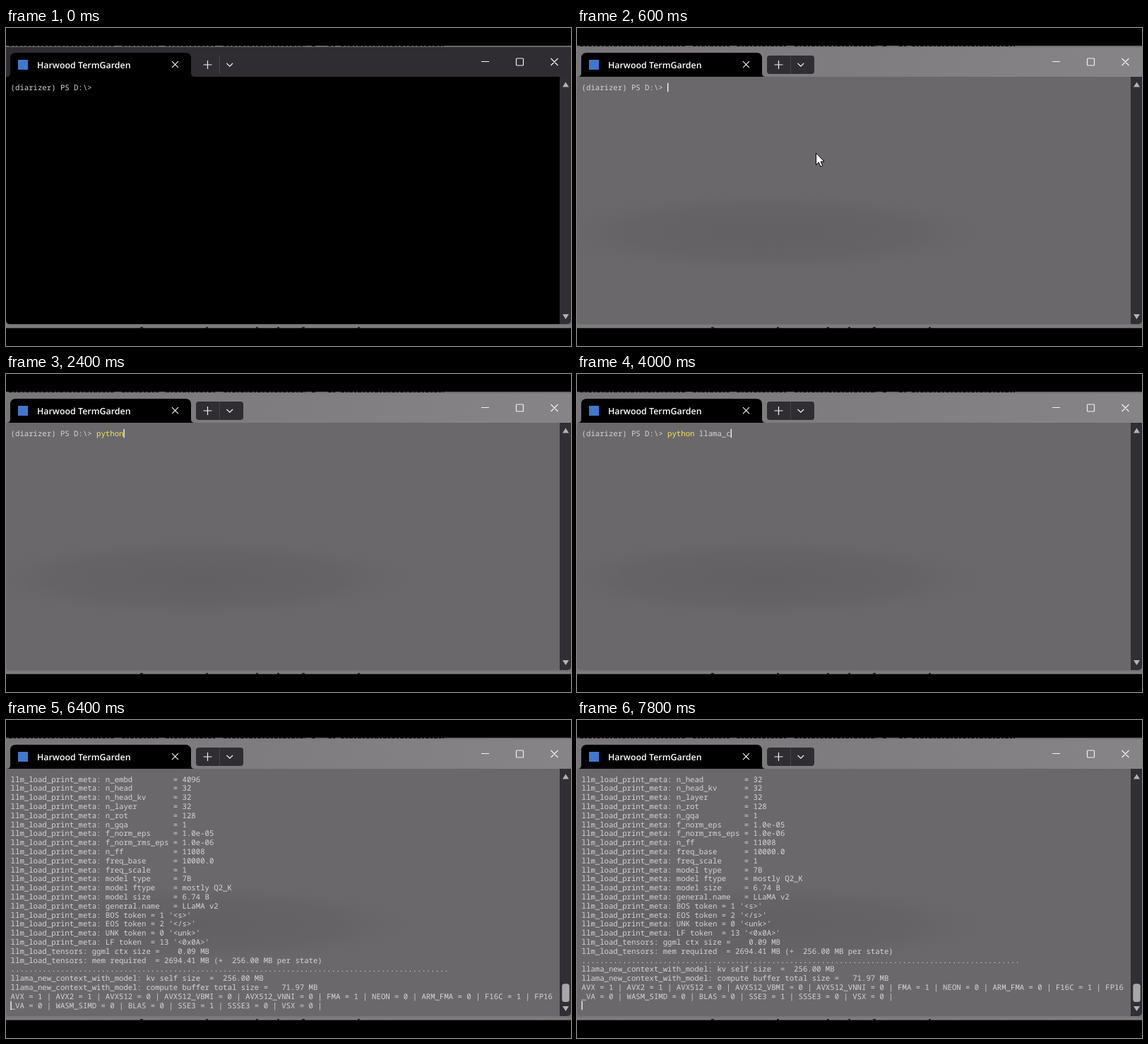
Write an HTML page that moves like this. It is 800 px wide and 450 px high and loops after 8 s.

```html
<!DOCTYPE html>
<html lang="en">
<head>
<meta charset="utf-8">
<title>Terminal session</title>
<style>
  html, body { margin: 0; width: 100%; height: 100%; overflow: hidden; background: #000; }
  svg { display: block; width: 800px; height: 450px; }
  text { white-space: pre; text-rendering: geometricPrecision; }
  .mono { font: 500 10.667px "Noto Sans Mono", "DejaVu Sans Mono", monospace; fill: #d6d5d6; }
  .title { font: 600 12.4px "Open Sans", "Noto Sans", sans-serif; fill: #fff; }
  .cmd { fill: #f2ea5a; }
  .line { fill: none; stroke: #f2f2f2; stroke-width: 1.2; }
  .bar { fill: #2f2d31; }
  .focus .bar { fill: url(#barFill); }
  .focus .page { fill: #6a686a; }
  .lit { visibility: hidden; }
  .focus .lit { visibility: visible; }
</style>
</head>
<body>
<svg id="stage" viewBox="0 0 800 450">
  <defs>
    <linearGradient id="barFill">
      <stop offset="0" stop-color="#787678"/>
      <stop offset="1" stop-color="#868486"/>
    </linearGradient>
    <radialGradient id="shade">
      <stop offset="0" stop-color="#626062"/>
      <stop offset=".6" stop-color="#646264" stop-opacity=".8"/>
      <stop offset="1" stop-color="#6a686a" stop-opacity="0"/>
    </radialGradient>
    <linearGradient id="edge" x2="0" y2="1">
      <stop offset="0" stop-color="#5c5c5c"/>
      <stop offset="1" stop-color="#838383"/>
    </linearGradient>
    <clipPath id="body"><rect y="69" width="784" height="350"/></clipPath>
  </defs>
  <rect width="800" height="450"/>

  <!-- slivers of the page behind the window -->
  <rect y="25" width="800" height="2" fill="#6c6c6c"/>
  <path d="M4 25.2H155M164 25.2H216M226 25.2H298M308 25.2H424M433 25.2H440M456 25.2H466M474 25.2H620" stroke="#111" stroke-width="1.6" stroke-dasharray="5 2 3 2"/>
  <rect y="410" width="800" height="14.6" fill="url(#edge)"/>
  <path d="M190 424h4M283 424h3M354 424h3M384 424h3M419 424h4M498 424h3" stroke="#222" stroke-width="2"/>

  <path class="bar" d="M0 27H800V69H0z"/>
  <path class="page" d="M0 69H790V419H6Q0 419 0 413z"/>
  <ellipse class="lit" clip-path="url(#body)" cx="270" cy="289" rx="340" ry="62" fill="url(#shade)"/>
  <path d="M784 69H800V413Q800 419 794 419H784z" fill="#312f33"/>
  <path d="M788 83.5L792.5 76.5L797 83.5zM788 405L792.5 412L797 405z" fill="#b4b2b5"/>
  <rect id="thumb" x="787.3" y="373.3" width="10.4" height="25.6" rx="3.5" fill="#a9a7aa"/>

  <path d="M1 69Q6 69 6 64V43Q6 35 14 35H254Q262 35 262 43V64Q262 69 267 69z"/>
  <rect x="17" y="45" width="14" height="14" fill="#4078cf"/>
  <text class="title" x="44" y="57.4">Harwood TermGarden</text>
  <rect class="lit" x="269" y="39" width="67" height="26" rx="4" fill="#2f2d31"/>
  <path d="M302.5 39V65" stroke="#454347"/>
  <path class="line" d="M235 47.2l9 9m0-9l-9 9M279.5 52h12m-6-6v12M312.5 50l4.3 4.2l4.3-4.2M673 47.5h11M771.5 43l10 10m0-10l-10 10"/>
  <rect class="line" x="722.5" y="43" width="10" height="10" rx="1"/>

  <g id="log" class="mono"></g>
  <text id="prompt" class="mono" x="6.6" y="87.6">(diarizer) PS D:\&gt; <tspan id="cmd" class="cmd"></tspan><tspan id="arg"></tspan></text>
  <rect id="caret" width="1.3" height="12.4" fill="#fff"/>
  <path id="pointer" d="M338.5 177v16.6l3.8-3.5l2.6 6l2.8-1.2l-2.6-5.9h5z" fill="#fff" stroke="#000"/>
</svg>
<script>
const $ = id => document.getElementById(id);
const LOOP = 8000, CELL = 6.4, ROW = 12.8, ROWS = 26;
const command = 'python llama_cpp.py';

// [time, characters typed]
const keys = [
  [1800, 1], [2000, 3], [2200, 4], [2400, 6], [2800, 7],
  [3000, 8], [3200, 9], [3400, 10], [3600, 12], [3800, 13], [4000, 14],
  [4400, 15], [4800, 16], [5200, 17], [6000, 19]
];

const meta = [
  ['n_embd', '4096'], ['n_head', '32'], ['n_head_kv', '32'], ['n_layer', '32'],
  ['n_rot', '128'], ['n_gqa', '1'], ['f_norm_eps', '1.0e-05'],
  ['f_norm_rms_eps', '1.0e-06'], ['n_ff', '11008'], ['freq_base', '10000.0'],
  ['freq_scale', '1'], ['model type', '7B'], ['model ftype', 'mostly Q2_K'],
  ['model size', '6.74 B'], ['general.name', 'LLaMA v2']
].map(([key, value]) => key.padEnd(15) + '= ' + value);

const tokens = ["BOS token = 1 '<s>'", "EOS token = 2 '</s>'", "UNK token = 0 '<unk>'", "LF token  = 13 '<0x0A>'"];

const output = [
  ...[...meta, ...tokens].map(s => 'llm_load_print_meta: ' + s),
  'llm_load_tensors: ggml ctx size =    0.09 MB',
  'llm_load_tensors: mem required  = 2694.41 MB (+  256.00 MB per state)',
  '.'.repeat(97),
  'llama_new_context_with_model: kv self size  =  256.00 MB',
  'llama_new_context_with_model: compute buffer total size =   71.97 MB',
  'AVX = 1 | AVX2 = 1 | AVX512 = 0 | AVX512_VBMI = 0 | AVX512_VNNI = 0 | FMA = 1 | NEON = 0 | ARM_FMA = 0 | F16C = 1 | FP16',
  '_VA = 0 | WASM_SIMD = 0 | BLAS = 0 | SSE3 = 1 | SSSE3 = 0 | VSX = 0 |'
];

const rows = Array.from({ length: ROWS }, (_, i) => {
  const row = document.createElementNS('http://www.w3.org/2000/svg', 'text');
  row.setAttribute('x', 6.6);
  row.setAttribute('y', 87.6 + i * ROW);
  return $('log').appendChild(row);
});

const show = (id, on) => $(id).style.visibility = on ? 'visible' : 'hidden';
const within = (t, a, b) => t >= a && t < b;

function draw(t) {
  const done = t >= 6400;
  const scroll = t >= 6800 ? 1 : 0;
  const typed = keys.reduce((n, [at, count]) => t >= at ? count : n, 0);

  $('stage').classList.toggle('focus', t >= 600);
  show('pointer', within(t, 200, 1000));
  show('prompt', !done);
  show('log', done);
  show('thumb', done);

  $('cmd').textContent = command.slice(0, Math.min(typed, 6));
  $('arg').textContent = command.slice(6, Math.max(typed, 6));
  rows.forEach((row, i) => row.textContent = output[i + scroll] || '');

  const col = done ? 0 : 19 + typed;
  const line = done ? ROWS - 1 : 0;
  $('caret').setAttribute('x', CELL * (col + 1));
  $('caret').setAttribute('y', 77.8 + ROW * line);
  show('caret', t >= 600 && !within(t, 1000, 1200) && !within(t, 6800, 7800));
}

let last = -1;
function tick() {
  const t = performance.now() % LOOP;
  const step = Math.floor(t / 200);
  if (step !== last) draw(t);
  last = step;
  requestAnimationFrame(tick);
}
tick();
</script>
</body>
</html>
```
